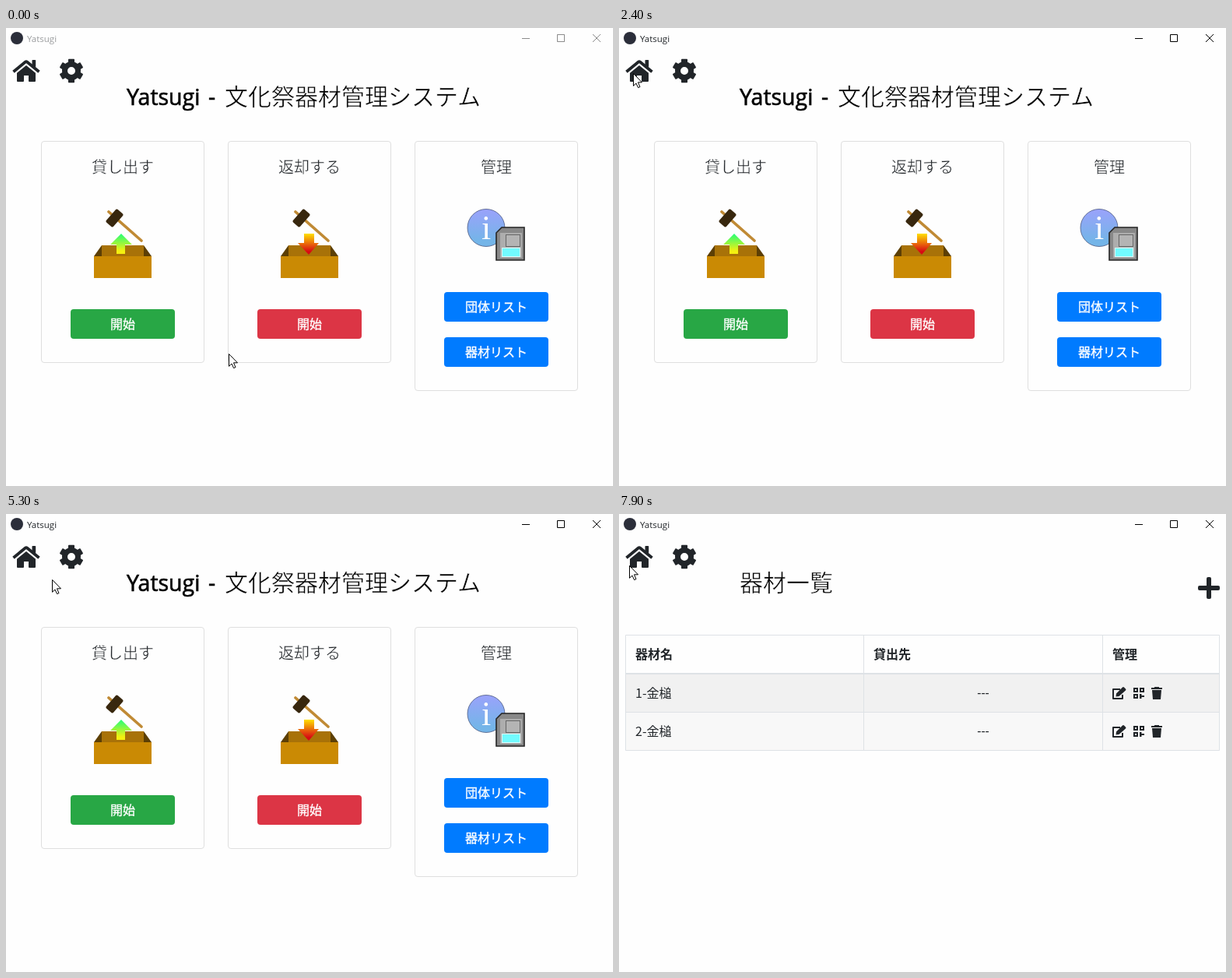
Recreate the animation shown at these times as an HTML page. Size 780 px wide and 588 px high, loop 8 s.

```html
<!DOCTYPE html>
<html lang="ja">
<head>
<meta charset="utf-8">
<title>Yatsugi</title>
<style>
html, body { margin: 0; width: 100%; height: 100%; overflow: hidden; background: #fefefe; }
svg { display: block; width: 780px; height: 588px; }
text { font-family: "Noto Sans CJK JP", "Noto Sans CJK", sans-serif; font-size: 16px; fill: #212529; }
.latin { font-family: "Open Sans", "Noto Sans", sans-serif; }
.small { font-size: 11.5px; }
.wait { font-size: 14.2px; }
/* A hairline in the background colour lightens the strokes */
.h1 { font-size: 30px; fill: #000; stroke: #fefefe; stroke-width: .6px; }
.h2 { font-size: 20px; stroke: #fefefe; stroke-width: .4px; }
.h1.latin { font-size: 28.5px; stroke: #000; }
.btn { fill: #fff; stroke: #fff; stroke-width: .35px; }
.th { font-weight: 700; }
.mid { text-anchor: middle; }
.info { font: 44px "Liberation Serif", serif; fill: #fff; }
.ink { fill: #212529; }
.line { fill: none; stroke: #212529; stroke-width: 2; }
.card { fill: #fefefe; stroke: #dfdfdf; }
.rule { fill: none; stroke: #dee2e6; }
</style>
</head>
<body>
<svg id="stage" viewBox="0 0 780 588"></svg>
<script>
const BLUE = ['#007bff', '#0069d9', '#80bdff'];
const GREEN = ['#28a745', '#218838', '#93d3a2'];
const RED = ['#dc3545', '#c82333', '#ed9aa2'];

const text = (x, y, s, cls = '') => `<text x="${x}" y="${y}" class="${cls}">${s}</text>`;
const rect = (x, y, w, h, attrs = 'class="ink"') => `<rect x="${x}" y="${y}" width="${w}" height="${h}" ${attrs}/>`;
const path = (d, attrs = 'class="ink"') => `<path d="${d}" ${attrs}/>`;
const at = (x, y, body, more = '') => `<g transform="translate(${x} ${y}) ${more}">${body}</g>`;
const repeat = (n, make) => Array.from({ length: n }, (_, i) => make(i)).join('');
const card = (x, y, w, h) => rect(x + .5, y + .5, w - 1, h - 1, 'rx="3.5" class="card"');
const title = s => text(155, 99, s, 'h1');
const page = (id, body) => `<g id="${id}">${body}</g>`;
const gradient = (id, from, to) =>
  `<linearGradient id="${id}" x2="0" y2="1"><stop stop-color="${from}"/><stop offset=".85" stop-color="${to}"/></linearGradient>`;

const buttons = {};
function button(id, x, y, w, label, colors) {
  buttons[id] = colors;
  return `<g id="btn-${id}">` +
    rect(x - 3.2, y - 3.2, w + 6.4, 44.4, `rx="7" fill="${colors[2]}"`) +
    rect(x, y, w, 38, `rx="4" fill="${colors[0]}"`) +
    text(x + w / 2, y + 25, label, 'btn mid') + '</g>';
}

const house = at(8, 39,
  path('M18 8.900L6 18.700V29q0 1 1 1H14q1 0 1-1V22H21V29q0 1 1 1H29q1 0 1-1V18.700Z') +
  path('M1.500 17.200L17 4.500q1-.8 2 0L34.500 17.200', 'class="line" stroke-linejoin="round" style="stroke-width:3.8px"') +
  rect(25.5, 2, 4.7, 9, 'rx=".7" class="ink"'));

const gear = at(84, 55, '<circle r="8.500" class="line" style="stroke-width:7px"/>' +
  repeat(6, i => rect(-4, -15.3, 8, 5, `rx=".8" class="ink" transform="rotate(${i * 60})"`)));

const toolbox = (x, arrow) => at(x, 0,
  path('M87 236L129 273', 'stroke="#c08a34" stroke-width="3.600" stroke-linecap="round"') +
  at(94.5, 244, rect(-11, -6, 22, 12, 'rx="2" fill="#38270e"'), 'rotate(-49)') +
  path('M68 293L78 279H132L142 293Z', 'fill="#5c3f05"') +
  rect(78, 279, 54, 14, 'fill="#a87208"') +
  rect(68, 293, 74, 28, 'fill="#ca8a04"') + arrow);
const upArrow = path('M103 264L117 278H108V290H97V278H89Z', 'fill="url(#up)"');
const downArrow = path('M98 264H111V276H117L104 291 90 276H98Z', 'fill="url(#down)"');

const infoIcon = '<circle cx="617" cy="256.500" r="24" fill="url(#sky)" stroke="#4c5a80" stroke-width=".8"/>' +
  text(617, 271, 'i', 'info mid') +
  path('M637 256H666V298H630V263Z', 'fill="#888" stroke="#252525" stroke-width="1.600"') +
  rect(635, 263, 28, 32, 'fill="#adadad"') +
  rect(642.5, 265.5, 18, 15, 'fill="#b4b4b4" stroke="#666"') +
  rect(637.5, 282.5, 23, 11, 'fill="#72fbff" stroke="#d8ffff"');

const editIcon = path('M10 3H1V15H13V10', 'class="line" stroke-linejoin="round"') +
  path('M5 8.500L13 .6q1-1 2 0l2 2q1 1 0 2L8.500 12l-4 .5Z');
const gridIcon = repeat(3, i => rect(28 + i % 2 * 8, 2 + (i >> 1) * 8, 4, 4, 'class="line"')) +
  rect(35, 9, 2.5, 6) + rect(37, 11, 4, 2);
const binIcon = rect(50, 1, 14, 2) + rect(54, 0, 6, 2) + path('M51 4H63L62 16H52Z');

const row = (y, id, label) => rect(8, y, 764, 49, `id="${id}"`) +
  text(21, y + 30, label) + text(468, y + 29, '---', 'mid latin') + at(634, y + 16, editIcon + gridIcon + binIcon);

stage.innerHTML = '<defs>' + gradient('up', '#22ff78', '#f4f010') + gradient('down', '#ffe000', '#d80a14') +
  gradient('sky', '#9aa2fb', '#74b5e8') + '</defs>' +
  '<circle cx="14" cy="13" r="8" fill="#2b2e3a"/>' +
  page('caption', text(27, 17.5, 'Yatsugi', 'latin small')) +
  path('M663 13.500h10M708.500 8.500h9v9h-9zM754 8l10 10m0-10l-10 10', 'id="controls" fill="none" stroke="#000"') +
  house + gear +
  page('home', text(155, 99, 'Yatsugi', 'h1 latin') + text(260, 99, '-', 'h1 latin') + text(281, 99, '文化祭器材管理システム', 'h1') +
    ['貸し出す', '返却する', '管理'].map((s, i) =>
      card(45 + i * 240, 145, 210, i < 2 ? 285 : 321) + text(150 + i * 240, 186, s, 'h2 mid')).join('') +
    toolbox(45, upArrow) + toolbox(285, downArrow) + infoIcon +
    button('lend', 83, 361, 134, '開始', GREEN) + button('back', 323, 361, 134, '開始', RED) +
    button('groups', 563, 339, 134, '団体リスト', BLUE) + button('items', 563, 397, 134, '器材リスト', BLUE)) +
  page('lending', title('器材の貸出') + card(18, 145, 744, 156) + card(18, 321, 744, 134) +
    text(39, 186, '貸出団体', 'h2') + text(39, 361, '貸出器材', 'h2') + text(390, 239, 'Waiting...', 'mid latin wait') +
    button('confirmLend', 76, 485, 628, '貸し出す', BLUE)) +
  page('returning', title('器材の返却') + card(18, 145, 744, 134) + text(39, 186, '返却器材', 'h2') +
    button('confirmReturn', 76, 309, 628, '返却する', BLUE)) +
  page('list', title('器材一覧') + rect(744, 92, 28, 6, 'rx="2" class="ink"') + rect(755, 81, 6, 28, 'rx="2" class="ink"') +
    row(206, 'row1', '1-金槌') + row(255, 'row2', '2-金槌') +
    path('M8.500 155.500h763v148h-763zM314.500 155v148M621.500 155v148M8 254.500h764', 'class="rule"') +
    path('M8 205h764', 'class="rule" stroke-width="2"') +
    text(21, 186, '器材名', 'th') + text(327, 186, '貸出先', 'th') + text(634, 186, '管理', 'th')) +
  '<g id="cursor" fill="#fff" stroke="#000" stroke-linejoin="round">' +
  path('M.5.500V16.300L4 13l2.600 5.600 2.400-1L6.500 11.800h5Z', 'id="arrow"') +
  path('M-2 14V2.500a2 2 0 0 1 4 0V8q2-1.500 3 .5 2-1 3 .7 2.500-.5 2.500 1.500V15l-2 5.500v3h-10v-4l-4-7q0-2.500 3.500-1M2 8v5M5 9v4M8 10v3', 'id="hand"') +
  '</g>';

const smooth = u => u * u * (3 - 2 * u);
const settle = u => 1 - (1 - u) ** 2;
const brake = u => 1 - (1 - u) ** 3;

// Pointer moves: start, end, target x, target y, easing
const moves = [
  [400, 700, 191, 391, settle],
  [1600, 2000, 18, 58, smooth],
  [2450, 3000, 408, 373, smooth],
  [3700, 4300, 26, 62, brake],
  [5250, 5550, 470, 360, smooth],
  [5550, 6100, 535, 444, settle],
  [6150, 6700, 616, 427, settle],
  [7300, 7700, 13, 66, smooth]
];

// Each visit: page, button that opens it, time of hover, click and leaving
const visits = [
  ['lending', 'lend', 600, 900, 2300],
  ['returning', 'back', 3000, 3500, 5300],
  ['list', 'items', 6400, 7100, 8000]
];

const $ = id => document.getElementById(id);
const show = (el, on) => { el.style.display = on ? 'inline' : 'none'; };

function pointer(t) {
  let x = 286, y = 418;
  for (const [start, end, tx, ty, ease] of moves) {
    const k = ease(Math.min(1, Math.max(0, (t - start) / (end - start))));
    x += (tx - x) * k;
    y += (ty - y) * k;
  }
  return [Math.round(x), Math.round(y)];
}

function draw(time) {
  const t = Math.floor(time / 100) * 100;
  const [view, key, hover, click] = visits.find(v => t < v[4]);
  const opened = t > click;
  const hot = t >= hover && !opened;

  show($('home'), !opened);
  for (const [id] of visits) show($(id), opened && id === view);
  for (const id in buttons) {
    const [halo, face] = $('btn-' + id).children;
    const over = hot && id === key;
    show(halo, over && t === click);
    face.setAttribute('fill', buttons[id][over ? 1 : 0]);
  }

  const [x, y] = pointer(t);
  $('cursor').setAttribute('transform', `translate(${x} ${y})`);
  show($('arrow'), !hot);
  show($('hand'), hot);

  const focus = t >= 900 ? 1 : .45;
  $('caption').style.opacity = $('controls').style.opacity = focus;
  $('row1').setAttribute('fill', t === 7500 ? '#ececec' : '#f1f1f1');
  $('row2').setAttribute('fill', t >= 7500 ? '#f8f8f8' : '#fefefe');
}

const begin = performance.now();
function tick() {
  draw((performance.now() - begin) % 8000);
  requestAnimationFrame(tick);
}
tick();
</script>
</body>
</html>
```
